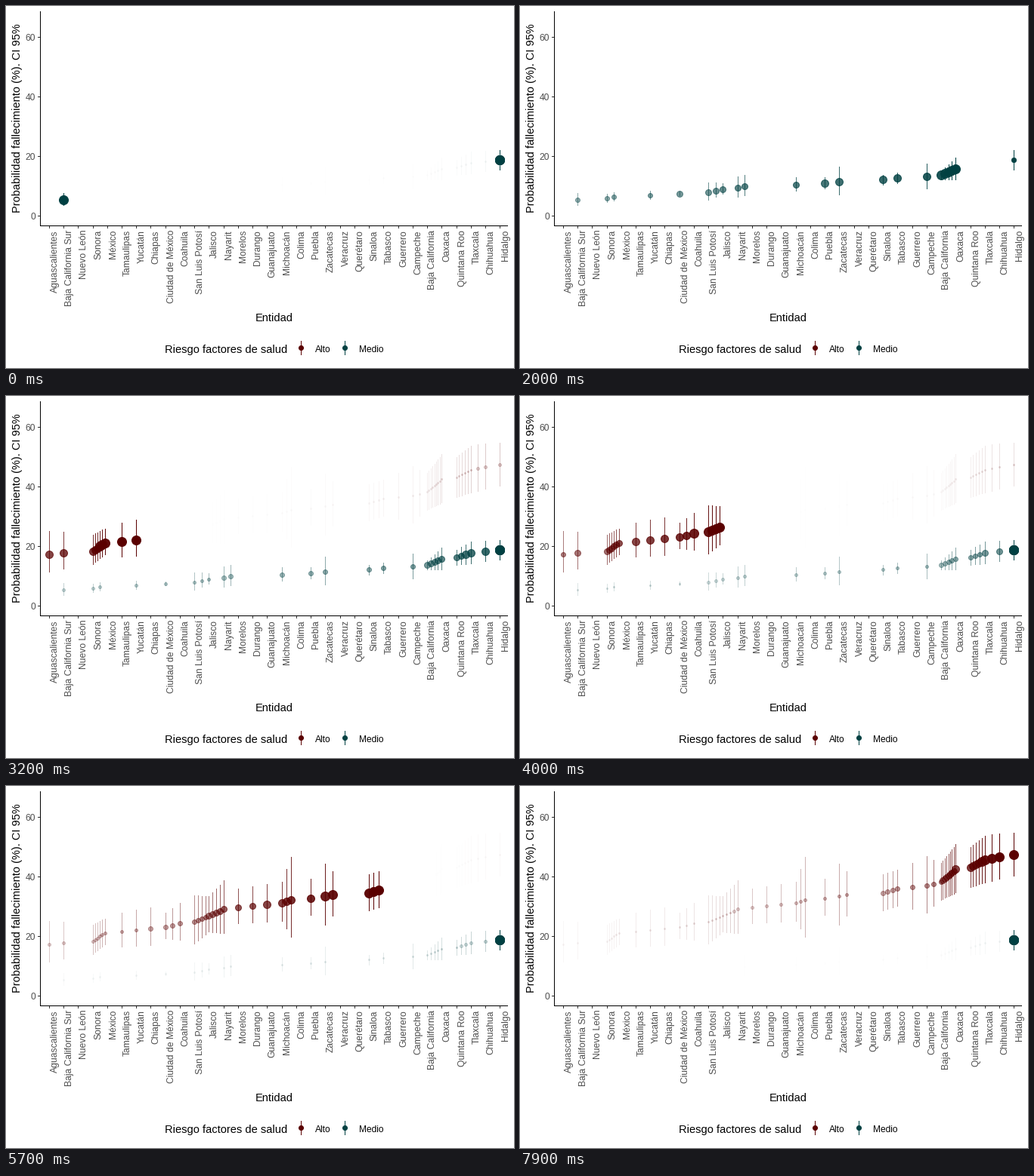
A matplotlib script that plays this animation: 672x480 px, repeating every 10000 ms.

```python
import numpy as np
import matplotlib.pyplot as plt
from matplotlib.animation import FuncAnimation
from matplotlib.collections import LineCollection
from matplotlib.colors import to_rgb

plt.rcParams["font.family"] = "Liberation Sans"

W, H, DPI = 672, 480, 96
PT = 72 / DPI                      # points per pixel
STEPS, FRAMES = 80, 100            # moving steps, then a hold on the last one
RED, TEAL = "#5A0000", "#004042"
GREY, TICK = "#4D4D4D", "#333333"

STATES = [
    "Aguascalientes", "Baja California Sur", "Nuevo León", "Sonora", "México",
    "Tamaulipas", "Yucatán", "Chiapas", "Ciudad de México", "Coahuila",
    "San Luis Potosí", "Jalisco", "Nayarit", "Morelos", "Durango",
    "Guanajuato", "Michoacán", "Colima", "Puebla", "Zacatecas", "Veracruz",
    "Querétaro", "Sinaloa", "Tabasco", "Guerrero", "Campeche",
    "Baja California", "Oaxaca", "Quintana Roo", "Tlaxcala", "Chihuahua",
    "Hidalgo",
]

fig = plt.figure(figsize=(W / DPI, H / DPI), dpi=DPI, facecolor="white")
ax = fig.add_axes([0, 0, 1, 1])
ax.set(xlim=(0, W), ylim=(H, 0))
ax.axis("off")


def column_x(col):
    return np.round(56.8 + 19.24 * np.asarray(col)) + 0.5


def marker_area(radius):
    return (2 * radius * PT) ** 2


def add_lines(segments, color):
    lines = LineCollection(segments, colors=color, linewidths=PT,
                           capstyle="butt", snap=False)
    return ax.add_collection(lines, autolim=False)


def label(x, y, text, size, color="black", ha="left", rotation=0):
    ax.text(x, y, text, fontsize=size * PT, color=color, ha=ha, va="baseline",
            rotation=rotation, rotation_mode="anchor")


def draw_axes():
    add_lines([[(45.5, 7), (45.5, 292)], [(45, 291.5), (664, 291.5)]], "black")
    columns = column_x(np.arange(len(STATES)))
    add_lines([[(x, 292), (x, 295)] for x in columns], TICK)
    for x, name in zip(columns, STATES):
        label(x + 10, 297, name, 12.15, GREY, "right", 90)
    for value in (0, 20, 40, 60):
        y = round(278.2 - 3.958 * value) + 0.5
        add_lines([[(42, y), (45, y)]], TICK)
        label(39.3, y + 4.7, str(value), 12, GREY, "right")
    label(354.8, 417.5, "Entidad", 14.6, ha="center")
    label(19.5, 149, "Probabilidad fallecimiento (%). CI 95%", 14.6,
          ha="center", rotation=90)


def draw_legend():
    label(209.5, 459.7, "Riesgo factores de salud", 14.67)
    for x, color, text in ((390.5, RED, "Alto"), (448.5, TEAL, "Medio")):
        add_lines([[(x, 444), (x, 463)]], color)
        ax.add_patch(plt.Circle((x, 453.5), 3, color=color, lw=PT, snap=False))
        label(x + 18.5, 458.7, text, 12)


def visit_columns(skipped, stays):
    """Walk the columns, splitting the way to the next one into equal steps."""
    path = []
    for col in range(len(STATES)):
        if col not in skipped:
            count = stays.get(col, 1)
            path += [col + i / count for i in range(count)]
    return np.array(path)


class Series:
    """A point range climbing steadily across the columns with a fading wake."""

    def __init__(self, color, start, y_from, y_to, path, margins):
        self.start = start
        self.steps = np.arange(start, STEPS)
        x = np.full(len(self.steps), column_x(path[-1]))
        x[:len(path)] = column_x(path)
        col = np.append(path, np.full(len(x) - len(path), path[-1]))
        y = np.interp(self.steps, [start, start + len(path) - 1], [y_from, y_to])
        up = np.interp(col, *zip(*margins))
        down = up * (0.75 + 0.007 * col)       # intervals even out to the right
        self.points = np.column_stack([x, np.round(y) + 0.5])
        self.ranges = np.stack([np.column_stack([x, np.round(y - up)]),
                                np.column_stack([x, np.round(y + down) + 1])],
                               axis=1)
        self.rgb = np.tile(to_rgb(color), (len(x), 1))
        self.lines = add_lines([], color)
        self.dots = ax.scatter(x, y, color=color, linewidths=PT, snap=False)

    def update(self, now):
        for artist in (self.lines, self.dots):
            artist.set_visible(now >= self.start)
        age = (now - self.steps) % STEPS
        order = np.argsort(-age)
        fade = (1 - np.maximum(age[order] - 1, 0) / STEPS) ** 3
        rgba = np.column_stack([self.rgb, fade])
        radius = np.maximum(np.round(0.47 + 5.69 * fade), 1)
        self.lines.set_segments(self.ranges[order])
        self.lines.set_color(rgba)
        self.dots.set_offsets(self.points[order])
        self.dots.set_sizes(marker_area(radius), fig.dpi)
        self.dots.set_color(rgba)


draw_axes()
draw_legend()

medio_path = visit_columns({0, 2, 4, 5, 7, 9, 13, 14, 15, 17, 20, 21, 24},
                           {3: 2, 10: 2, 12: 2, 26: 4, 28: 3})
alto_path = visit_columns({2, 4, 17, 20, 21},
                          {3: 6, 8: 2, 10: 4, 11: 4, 16: 3, 19: 2, 22: 3,
                           25: 2, 26: 8, 28: 5, 29: 2})
# Interval reach above the estimate: (column, pixels)
medio_margins = [(1, 9), (3, 6), (6, 6), (8, 3), (10, 13), (11, 8), (12, 15),
                 (16, 10), (18, 8), (19, 20), (22, 7), (23, 7), (25, 17),
                 (26, 6), (27, 15), (28, 10), (29, 15), (31, 13)]
alto_margins = [(0, 31), (4, 19), (5, 25), (7, 28), (8, 19), (10, 35), (11, 26),
                (12, 38), (13, 25), (16, 28), (17, 71), (18, 26), (19, 43),
                (20, 20), (22, 25), (23, 25), (25, 39), (26, 25), (27, 33),
                (28, 27), (29, 32), (31, 29)]
series = [Series(TEAL, 0, 257, 204, medio_path, medio_margins),
          Series(RED, 23, 210, 91.4, alto_path, alto_margins)]


def update(frame):
    for s in series:
        s.update(min(frame, STEPS - 1))
    return [artist for s in series for artist in (s.lines, s.dots)]


anim = FuncAnimation(fig, update, frames=FRAMES, interval=1000 // 10,
                     repeat=True, repeat_delay=0, blit=False)
plt.show()
```
